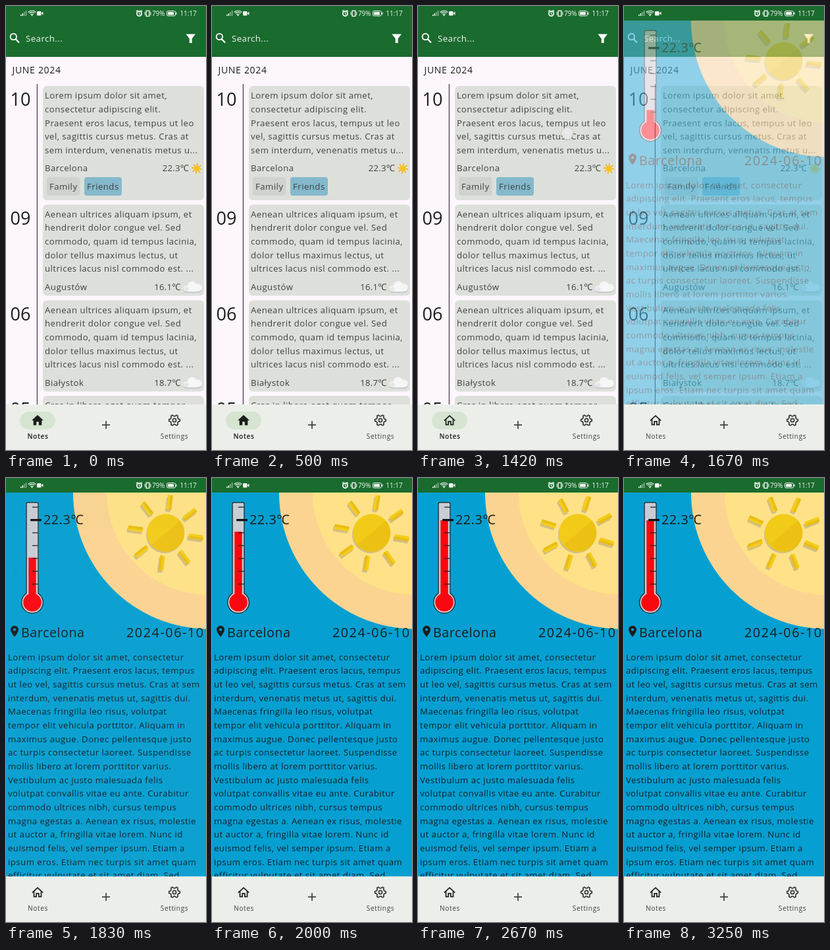
Write an HTML page with a canvas that moves like this. It is 304 px wide and 672 px high and loops after 3330 ms.

```html
<!DOCTYPE html>
<html lang="en">
<head>
<meta charset="utf-8">
<title>Notes</title>
<style>
  html, body { margin: 0; width: 100%; height: 100%; overflow: hidden; }
  canvas { display: block; width: 304px; height: 672px; }
</style>
</head>
<body>
<canvas id="stage"></canvas>
<script>
const W = 304, H = 672, LOOP = 3330, TAU = Math.PI * 2;
const BAR_H = 22, NAV_Y = 603, LINE = 20.67;
const FONT = '"Open Sans", "Noto Sans", "Noto Sans CJK SC", sans-serif';
const GREEN = '#1a6b2e', PAPER = '#fdf7fd', BLUE = '#069fd1';
const INK = '#1b1d1a', SOFT = '#3d413c';

const dpr = window.devicePixelRatio || 1;
const stage = document.getElementById('stage');
const layer = document.createElement('canvas');
const [main, over] = [stage, layer].map(c => {
  c.width = W * dpr;
  c.height = H * dpr;
  const ctx = c.getContext('2d');
  ctx.scale(dpr, dpr);
  return ctx;
});
let g = main;

const clamp = v => Math.min(1, Math.max(0, v));
const ramp = (t, a, b) => clamp((t - a) / (b - a));
const smooth = p => p * p * (3 - 2 * p);

function rect(x, y, w, h, color, r = 0) {
  g.fillStyle = color;
  g.beginPath();
  g.roundRect(x, y, w, h, r);
  g.fill();
}

function disc(x, y, r, color) {
  g.fillStyle = color;
  g.beginPath();
  g.arc(x, y, r, 0, TAU);
  g.fill();
}

function ring(x, y, r, color, width) {
  g.strokeStyle = color;
  g.lineWidth = width;
  g.beginPath();
  g.arc(x, y, r, 0, TAU);
  g.stroke();
}

function poly(points, color, width) {
  g.beginPath();
  points.forEach(([x, y], i) => i ? g.lineTo(x, y) : g.moveTo(x, y));
  if (width) {
    g.strokeStyle = color;
    g.lineWidth = width;
    g.stroke();
  } else {
    g.fillStyle = color;
    g.fill();
  }
}

function text(str, x, y, { size = 13.2, color = SOFT, weight = 400, gap = 0.47, align = 'left' } = {}) {
  g.font = `${weight} ${size}px ${FONT}`;
  g.letterSpacing = gap + 'px';
  g.textAlign = align;
  g.fillStyle = color;
  g.fillText(str, x, y);
}

function clipped(x, y, w, h, draw) {
  g.save();
  g.beginPath();
  g.rect(x, y, w, h);
  g.clip();
  draw();
  g.restore();
}

/* Status bar */
function statusBar() {
  rect(0, 0, W, BAR_H, GREEN);
  const white = '#f2f7f2';
  for (let i = 0; i < 4; i++) {
    rect(22 + i * 2.6, 13 - i * 2, 1.5, 2 + i * 2, i < 2 ? white : '#8db596');
  }
  g.strokeStyle = white;
  g.lineWidth = 1.2;
  for (const r of [3, 5.6, 8]) {
    g.beginPath();
    g.arc(39.5, 15, r, -Math.PI * 0.76, -Math.PI * 0.24);
    g.stroke();
  }
  disc(39.5, 14.2, 1.1, white);
  rect(47, 8, 6.5, 6.5, white, 1.3);
  poly([[53.5, 11], [56.5, 8.4], [56.5, 14]], white);

  ring(202.5, 11.5, 3.6, white, 1.8);
  poly([[202.5, 9.3], [202.5, 12], [204.3, 12.8]], white, 1.2);
  poly([[198, 8.3], [200.5, 6.3]], white, 1.4);
  poly([[207, 8.3], [204.5, 6.3]], white, 1.4);

  g.lineWidth = 1.4;
  g.strokeRect(213.2, 7.2, 4.6, 8.2);
  for (const x of [211.2, 219.8]) poly([[x, 8.8], [x, 13.8]], white, 1.1);

  text('79%', 222, 14.7, { size: 10, color: white, gap: -0.1 });
  g.lineWidth = 1;
  g.beginPath();
  g.roundRect(244.5, 7.5, 13, 7.5, 2);
  g.stroke();
  rect(246, 9, 9, 4.5, white, 0.5);
  rect(258.4, 9.5, 1.2, 3.5, white);
  text('11:17', 264.5, 14.7, { size: 10, color: white, gap: -0.1 });
}

/* List page */
const NOTE = [
  'Aenean ultrices aliquam ipsum, et', 'hendrerit dolor congue vel. Sed',
  'commodo, quam id tempus lacinia,', 'dolor tellus maximus lectus, ut',
  'ultrices lacus nisl commodo est. ...'
];
const sun = { draw: sunIcon, edge: 278 };
const cloud = { draw: cloudIcon, edge: 265.5 };
const NOTES = [
  { day: '10', y: 121, h: 173, place: 'Barcelona', temp: '22.3℃', icon: sun, lines: [
    'Lorem ipsum dolor sit amet,', 'consectetur adipiscing elit.',
    'Praesent eros lacus, tempus ut leo', 'vel, sagittis cursus metus. Cras at',
    'sem interdum, venenatis metus u...'] },
  { day: '09', y: 300.5, h: 138, place: 'Augustów', temp: '16.1℃', icon: cloud, lines: NOTE },
  { day: '06', y: 445.5, h: 138, place: 'Białystok', temp: '18.7℃', icon: cloud, lines: NOTE },
  { day: '05', y: 590, h: 138, lines: ['Cras in libero eget quam tempor'] }
];

function sunIcon(y) {
  for (let i = 0; i < 8; i++) {
    const a = i * TAU / 8 + 0.15, c = Math.cos(a), s = Math.sin(a);
    poly([[290 + c * 5, y + s * 5], [290 + c * 8, y + s * 8]], '#f0b429', 1.8);
  }
  disc(290, y, 4.8, '#f7c320');
}

function cloudIcon(y) {
  const puffs = (dy, color) => {
    disc(274, y + 3 + dy, 4.5, color);
    disc(283, y - 1 + dy, 7.2, color);
    disc(292, y + 1.5 + dy, 5.8, color);
    rect(274, y + 1 + dy, 18, 6.5, color, 2);
  };
  puffs(0.8, '#b9bbbe');
  puffs(-0.6, '#f6f6f8');
  disc(274, y + 3.2, 3.6, '#e6e7ea');
}

function noteCard({ day, y, h, place, temp, icon, lines }) {
  text(day, 6.5, y + 30.3, { size: 27, color: INK, gap: 0, weight: 500 });
  rect(56, y, 245, h, '#dde0da', 6);
  lines.forEach((s, i) => text(s, 59, y + 19.2 + i * LINE));
  if (!place) return;
  text(place, 59, y + 129);
  text(temp, icon.edge, y + 129, { align: 'right', gap: 0.2 });
  icon.draw(y + 125);
}

function tag(label, x, w, color) {
  rect(x, 259, w, 28, color, 4);
  text(label, x + 4, 278);
}

function listPage() {
  rect(0, 0, W, NAV_Y, PAPER);
  rect(0, 0, W, 77, GREEN);
  ring(11.3, 46.5, 4.7, '#fff', 1.8);
  poly([[14.6, 50], [20, 55.5]], '#fff', 2.2);
  text('Search...', 30, 53.7, { color: '#f4f8f4' });
  poly([[273.5, 42.5], [288, 42.5], [282.7, 49.5], [282.7, 56], [278.8, 56], [278.8, 49.5]], '#fff');

  text('JUNE 2024', 9.5, 102.3, { size: 14, color: INK, gap: 0.7 });
  rect(46.8, 118, 1.2, NAV_Y - 118, '#49333f');
  clipped(0, 77, W, NAV_Y - 77, () => NOTES.forEach(noteCard));
  tag('Family', 62, 50.5, '#d0d2d0');
  tag('Friends', 119, 57, '#84b9cc');
}

/* Detail page */
const BODY = [
  'Lorem ipsum dolor sit amet, consectetur', 'adipiscing elit. Praesent eros lacus, tempus',
  'ut leo vel, sagittis cursus metus. Cras at sem', 'interdum, venenatis metus ut, sagittis dui.',
  'Maecenas fringilla leo risus, volutpat', 'tempor elit vehicula porttitor. Aliquam in',
  'maximus augue. Donec pellentesque justo', 'ac turpis consectetur laoreet. Suspendisse',
  'mollis libero at lorem porttitor varius.', 'Vestibulum ac justo malesuada felis',
  'volutpat convallis vitae eu ante. Curabitur', 'commodo ultrices nibh, cursus tempus',
  'magna egestas a. Aenean ex risus, molestie', 'ut auctor a, fringilla vitae lorem. Nunc id',
  'euismod felis, vel semper ipsum. Etiam a', 'ipsum eros. Etiam nec turpis sit amet quam',
  'efficitur vulputate et sit amet diam. Sed'
];

function rays(turn, light, dark) {
  for (let i = 0; i < 8; i++) {
    g.save();
    g.rotate(turn + i * TAU / 8);
    rect(35, -3.8, 22.5, 7.6, light, 1.5);
    rect(35, 0, 22.5, 3.8, dark, 1);
    g.restore();
  }
}

function bigSun(t) {
  disc(308, 22.5, 206, '#fcd491');
  disc(307, 22.5, 154, '#ffe287');
  const turn = (17 + (t - 2670) * 0.0115) * Math.PI / 180;
  const shade = '#d3bd84';
  g.save();
  g.translate(241, 86);
  rays(turn, shade, shade);
  disc(0, 0, 28, shade);
  g.translate(1.8, -3);
  rays(turn, '#f3cd1b', '#e9bd14');
  disc(0, 0, 28.5, '#f2cb18');
  g.fillStyle = '#ecc113';
  g.beginPath();
  g.arc(0, 0, 28.5, -0.7, Math.PI - 0.7);
  g.fill();
  g.restore();
}

function thermometer(t) {
  const dark = '#1d2226', glass = '#c9ccd3', red = '#fb0710';
  const top = 175 - 111 * smooth(ramp(t, 1505, 2165));
  rect(30.5, 36.5, 19, 140, dark, 2.5);
  disc(40, 188.3, 17, dark);
  rect(31.7, 37.7, 16.6, 142, glass, 1.5);
  disc(40, 188.3, 15.7, glass);
  rect(34.3, top, 11.4, 184 - top, red);
  disc(40, 188.3, 13.8, red);
  for (let i = 0; i < 7; i++) rect(40, 43.5 + i * 19.4, 8.5, 1.3, dark);
  rect(37, 62, 17, 3.2, '#101214', 1);
}

function pin() {
  g.fillStyle = INK;
  g.beginPath();
  g.arc(13, 229.5, 6, Math.PI * 0.88, Math.PI * 0.12);
  g.quadraticCurveTo(17, 236, 13, 240.5);
  g.quadraticCurveTo(9, 236, 7.4, 231.7);
  g.fill();
  disc(13, 229.5, 2.1, BLUE);
}

function detailPage(t) {
  rect(0, 0, W, NAV_Y, BLUE);
  clipped(0, BAR_H, W, NAV_Y - BAR_H, () => {
    bigSun(t);
    thermometer(t);
    pin();
    const big = { size: 19.8, color: INK, gap: 0.5 };
    text('22.3℃', 57, 70, big);
    text('Barcelona', 23, 241, big);
    text('2024-06-10', 183, 241, { ...big, gap: 1.55 });
    BODY.forEach((s, i) => text(s, 3, 275.7 + i * LINE, { color: '#0b2029' }));
  });
}

/* Navigation bar */
function homeIcon(filled) {
  if (filled) {
    poly([[48, 619], [57, 627.3], [54.3, 627.3], [54.3, 634.5], [49.8, 634.5], [49.8, 629.3],
      [46.2, 629.3], [46.2, 634.5], [41.7, 634.5], [41.7, 627.3], [39, 627.3]], INK);
  } else {
    poly([[39.8, 627.6], [48, 620.2], [56.2, 627.6]], INK, 1.7);
    poly([[42.5, 625.5], [42.5, 633.6], [46.2, 633.6], [46.2, 628.8], [49.8, 628.8],
      [49.8, 633.6], [53.5, 633.6], [53.5, 625.5]], INK, 1.7);
  }
}

function gearIcon(x, y) {
  const pts = [];
  for (let i = 0; i < 24; i++) {
    const a = (i - 0.5) * TAU / 24, r = i % 4 < 2 ? 6.2 : 8.4;
    pts.push([x + r * Math.sin(a), y + r * Math.cos(a)]);
  }
  g.lineJoin = 'round';
  poly([...pts, pts[0], pts[1]], SOFT, 1.8);
  ring(x, y, 2.6, SOFT, 1.8);
  g.lineJoin = 'miter';
}

function navBar(t) {
  rect(0, NAV_Y, W, H - NAV_Y, '#ecefe9');
  g.globalAlpha = 1 - ramp(t, 1430, 1600);
  rect(21, 614, 54, 27, '#d5e5d1', 13.5);
  g.globalAlpha = 1;
  homeIcon(t < 1400);
  const label = { size: 10.2, gap: 0.6, align: 'center', color: SOFT, weight: 500 };
  text('Notes', 48.5, 655.3, t < 1580 ? { ...label, color: INK, weight: 600 } : label);
  text('Settings', 256, 655.3, label);
  rect(146, 633.2, 12, 1.7, SOFT);
  rect(151.2, 628, 1.7, 12, SOFT);
  gearIcon(256, 627);
}

function touchDot(t) {
  if (t < 1330 || t >= 1540) return;
  disc(227, 193.5, 10, 'rgba(120,120,120,0.25)');
  disc(227, 193, 9, 'rgba(240,240,240,0.8)');
}

function blend(alpha, draw) {
  if (!alpha) return;
  g = over;
  draw();
  g = main;
  g.globalAlpha = alpha;
  g.drawImage(layer, 0, 0, W, H);
  g.globalAlpha = 1;
}

function frame(now) {
  const t = now % LOOP;
  const fade = ramp(t, 1540, 1840);
  rect(0, 0, W, H, PAPER);
  blend(1 - 0.7 * fade, listPage);
  blend(fade, () => detailPage(t));
  statusBar();
  navBar(t);
  touchDot(t);
}

const start = performance.now();
function tick() {
  frame(performance.now() - start);
  requestAnimationFrame(tick);
}
tick();
</script>
</body>
</html>
```
